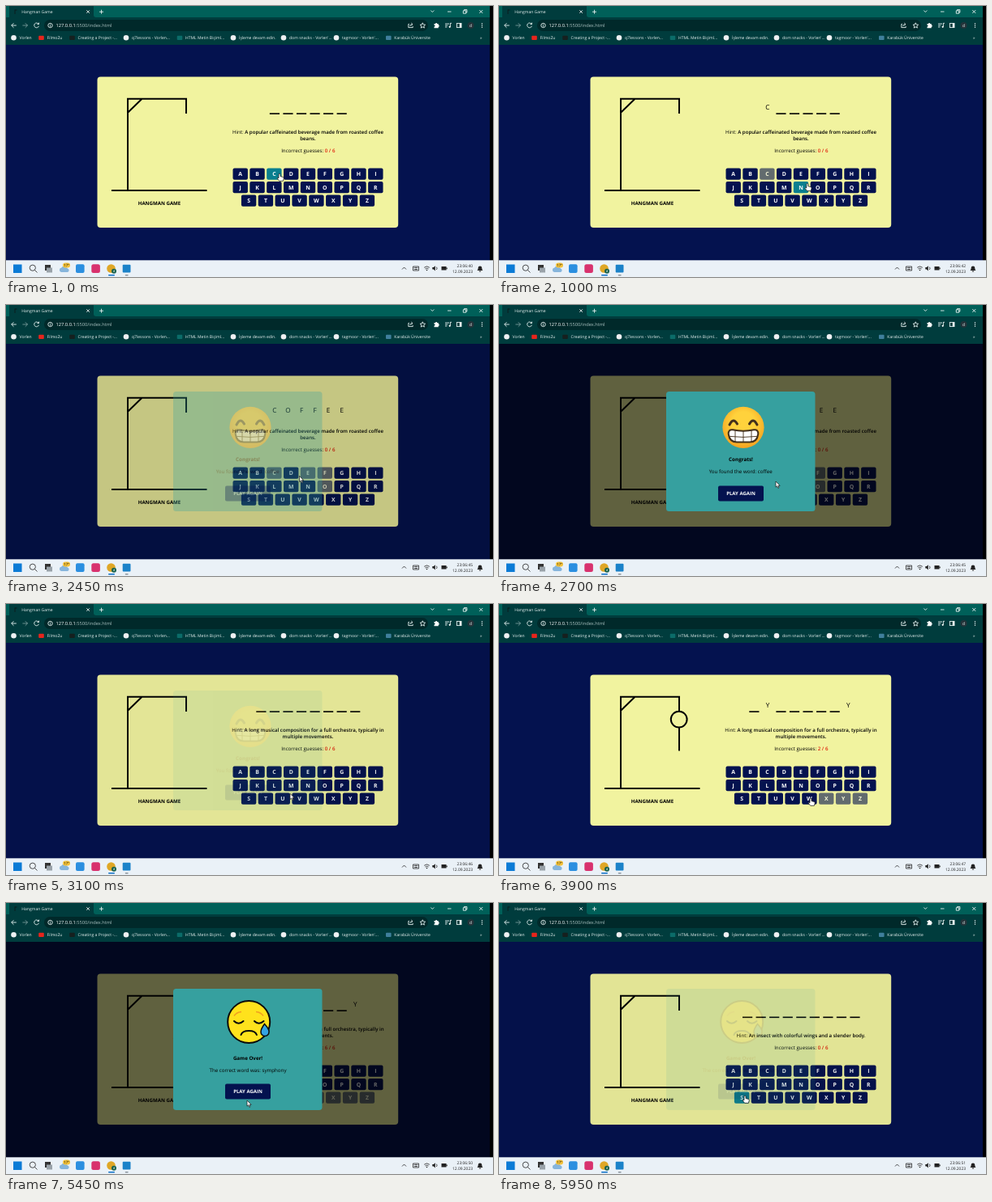
These frames come from a looping animation (600x335 px, 6 s). An HTML page:

```html
<!DOCTYPE html>
<html lang="en">
<head>
<meta charset="utf-8">
<title>Hangman Game</title>
<style>
  html, body { margin: 0; width: 100%; height: 100%; overflow: hidden; background: #000; }
  svg { display: block; width: 600px; height: 335px; font: 6.2px "Open Sans", sans-serif; text-rendering: geometricPrecision; }
  .mid { text-anchor: middle; }
  .end { text-anchor: end; }
  .b { font-weight: 700; }
  .sb { font-weight: 600; }
  .line { fill: none; stroke: #000; stroke-width: 2; }
  .thin { fill: none; stroke: #e6f0ef; stroke-width: .9; }
  .dark { fill: none; stroke: #222; stroke-width: .8; }
  .ui { font-size: 5.05px; fill: #e9f2f1; }
  .key rect { fill: #04124f; }
  .key text { fill: #fff; font-size: 6.9px; font-weight: 700; text-anchor: middle; }
  .key.hover rect { fill: #0a7f8f; }
  .key.used { opacity: .6; }
  .letter { font-size: 8.2px; font-weight: 500; text-anchor: middle; }
  .clock { font-size: 4.9px; fill: #222; text-anchor: end; }
</style>
</head>
<body>
<svg viewBox="0 0 600 335">
  <defs>
    <radialGradient id="gold" cx=".5" cy=".4" r=".62">
      <stop offset=".45" stop-color="#ffd23c"/><stop offset="1" stop-color="#f5a01f"/>
    </radialGradient>
  </defs>

  <!-- browser window -->
  <rect width="596" height="48" fill="#003c3d"/>
  <path d="M108 0H596V14H111Q108 14 108 11Z" fill="#006059"/>
  <path d="M0 0H4V14H0Z" fill="#006059"/>
  <path d="M11 4.5V10M11 5h2.5" stroke="#0a1d1f" fill="none"/>
  <text class="ui" x="19.3" y="9.2">Hangman Game</text>
  <path class="thin" d="M99.3 5.3l3.6 3.6m0-3.6l-3.6 3.6M117.5 4.7v5M115 7.2h5M523.3 5.5l2 2 2-2M544 7h4.5M563.3 5.8h3.4v3.4h-3.4zM564.5 5.8V4.6h3.4V8h-1.2M583.3 5l4 4m0-4l-4 4"/>
  <rect x="47" y="17" width="473" height="14" rx="7" fill="#00292a"/>
  <path class="thin" d="M12.8 24H6.7m2.8-2.8L6.7 24l2.8 2.8"/>
  <path class="thin" d="M20.4 24h6.1m-2.8-2.8l2.8 2.8-2.8 2.8" opacity=".5"/>
  <path class="thin" d="M40 22.2a2.9 2.9 0 1 0 .4 2.6M40.5 20.6v2h-2"/>
  <circle class="thin" cx="54.5" cy="24" r="2.7"/>
  <path class="thin" d="M54.5 23.6v2M54.5 22v.7"/>
  <text x="61.6" y="26.1" font-size="5.7" fill="#fff">127.0.0.1<tspan fill="#a9c0bf">:5500/index.html</tspan></text>
  <path class="thin" d="M497 22.4h-1.2v4.2h5.4v-1.6M497.6 25q.3-2.4 3-2.4m-1.2-1.6l1.6 1.6-1.6 1.6"/>
  <path class="thin" d="M513.3 20.8l1 2.2 2.3.2-1.8 1.6.6 2.3-2.1-1.2-2.1 1.2.6-2.3-1.8-1.6 2.3-.2z"/>
  <path d="M527.5 22h1.5a1.1 1.1 0 0 1 2.2 0h1.5v1.6a1.1 1.1 0 0 1 0 2.2v1.5h-5.2v-1.6a1.1 1.1 0 0 0 0-2.2z" fill="#fff"/>
  <path class="thin" d="M541 22h5M541 24h3.2M541 26h2.4M547.4 21v4.6M547.4 21.3h1.6"/>
  <circle cx="546.7" cy="25.8" r="1.1" fill="#fff"/>
  <rect class="thin" x="555.4" y="21.4" width="5.6" height="5.2"/>
  <path d="M558.8 21.4h2.2v5.2h-2.2z" fill="#fff"/>
  <circle cx="572.5" cy="24" r="4" fill="#24343a"/>
  <text class="ui mid" x="572.5" y="25.8">d</text>
  <g fill="#e9f2f1"><circle cx="586.5" cy="21.7" r=".7"/><circle cx="586.5" cy="24" r=".7"/><circle cx="586.5" cy="26.3" r=".7"/></g>
  <g id="marks"></g>
  <text class="ui" x="584" y="41" font-size="7">»</text>

  <!-- page -->
  <rect y="48" width="596" height="267" fill="#04124f"/>
  <rect x="112.5" y="87.6" width="370.7" height="186.4" rx="4" fill="#f1f39f"/>
  <path class="line" d="M130 228H247.5M150 228V114.7M149 114.7H223M222 114V133M150.3 131.5L167 115.2"/>
  <g id="body" class="line">
    <circle cx="221.7" cy="142.6" r="9.9"/>
    <path d="M222 152.5V181.5"/>
    <path d="M222 152.5L206.5 168.3"/>
    <path d="M222 152.5L237.5 168.3"/>
    <path d="M222 180L207 195"/>
    <path d="M222 180L237 195"/>
  </g>
  <text class="mid b" x="189" y="245.8" font-size="6.1">HANGMAN GAME</text>
  <g id="word"></g>
  <g font-size="6.13">
    <text class="mid" x="372" y="157.8">Hint: <tspan class="sb" id="hint1"></tspan></text>
    <text class="mid sb" x="372" y="166" id="hint2"></text>
  </g>
  <text class="mid" x="372.3" y="181">Incorrect guesses: <tspan class="sb" id="count" fill="#e0200c"></tspan></text>
  <g id="keys"></g>

  <!-- dialogs -->
  <rect id="shade" y="48" width="596" height="267"/>
  <g id="win">
    <rect x="206" y="107" width="183.5" height="148" rx="3.5" fill="#36a09f"/>
    <circle cx="301" cy="151.3" r="25.6" fill="url(#gold)"/>
    <path d="M284 148q4.700-9.500 9.500-1M308.500 147q4.700-8.500 9.500 1" fill="none" stroke="#43301c" stroke-width="3" stroke-linecap="round"/>
    <path d="M288 154.300Q301 157 314 154.300Q319.500 153.500 319.300 159.500Q318 169.500 309 169.500H293Q284 169.500 282.700 159.500Q282.500 153.500 288 154.300Z" fill="#fff" stroke="#43301c" stroke-width="2"/>
    <path d="M283 162.300Q301 164.500 319 162.300M291 155v14M301 156v13.500M311 155v14" fill="none" stroke="#43301c" stroke-width=".9"/>
    <text class="mid b" x="298" y="193.400" font-size="6.300">Congrats!</text>
    <text class="mid" x="297.700" y="208.400">You found the word: coffee</text>
  </g>
  <g id="lose">
    <rect x="206" y="106" width="183.500" height="150" rx="3.500" fill="#36a09f"/>
    <circle cx="299.200" cy="147" r="26" fill="#ffe21c" stroke="#0b0b0b" stroke-width="2"/>
    <path d="M281 139.500q3-4.500 9-5M308 134.500q6 .5 9 5" fill="none" stroke="#f0a020" stroke-width="1.500"/>
    <path d="M281 146q5.500 5.500 11.500 0M306 146q5.500 5.500 11.500 0M289.500 163q1.500-5 9.700-5t9.700 5" fill="none" stroke="#0b0b0b" stroke-width="2" stroke-linecap="round"/>
    <path d="M318.500 149.500Q324.500 156 324 159.500A5 5 0 0 1 314 159.500Q313.800 156 318.500 149.500Z" fill="#35a3e3" stroke="#0b0b0b" stroke-width="1.500"/>
    <text class="mid b" x="298" y="194.300">Game Over!</text>
    <text class="mid" x="298" y="209.300">The correct word was: symphony</text>
  </g>
  <g id="again">
    <rect x="270" y="223.500" width="56" height="19" rx="2" fill="#04124f"/>
    <text class="mid b" x="298" y="235.200" font-size="6" fill="#fff">PLAY AGAIN</text>
  </g>

  <!-- taskbar -->
  <rect y="314.300" width="600" height="20.700" fill="#eaf1f7"/>
  <rect x="9" y="319.500" width="10.500" height="10.500" fill="#0b7bd6"/>
  <circle class="dark" cx="32.800" cy="323.700" r="3.600" stroke-width="1.300"/>
  <path class="dark" d="M35.500 326.500l3 3"/>
  <rect x="48" y="320" width="7" height="7" fill="#333"/>
  <rect x="50" y="323.500" width="7" height="6" fill="#9aa3aa"/>
  <path d="M68 329a2.800 2.800 0 0 1 .4-5.500 4 4 0 0 1 7.400 1 2.300 2.300 0 0 1 0 4.500z" fill="#86b5dc"/>
  <rect x="70" y="317.500" width="9" height="6" rx="3" fill="#f5c33b"/>
  <text class="mid" x="74.700" y="322.200" font-size="4.400">17°</text>
  <rect x="86" y="319.300" width="10.600" height="10.600" rx="2" fill="#2b8fe0"/>
  <rect x="105.300" y="319.300" width="10.600" height="10.600" rx="2.500" fill="#d8326e"/>
  <circle cx="129.500" cy="324.500" r="5.300" fill="#dfa726"/>
  <circle cx="133" cy="327.700" r="3" fill="#17614d"/>
  <text class="mid" x="133" y="329.100" font-size="4" fill="#fff">d</text>
  <rect x="126" y="332" width="8" height="1.400" rx=".7" fill="#0b6fc7"/>
  <rect x="143.700" y="319.700" width="9.800" height="9.800" rx="1" fill="#1b82c9"/>
  <rect x="146.700" y="332" width="4" height="1.400" rx=".7" fill="#8a949c"/>
  <path class="dark" d="M488 325.500l2.500-2.500 2.500 2.500M501.500 322h7v5h-7zM503 325.500h4M502.800 323.600h4.500"/>
  <path class="dark" d="M515.200 323.300q3.300-2.800 6.600 0M516.500 325q2-1.600 4 0"/>
  <circle cx="518.500" cy="326.500" r=".8" fill="#222"/>
  <path d="M525.300 323h1.500l2-1.800v6.200l-2-1.800h-1.500z" fill="#222"/>
  <path class="dark" d="M530.300 322.600q1.500 1.700 0 3.400"/>
  <path d="M536.500 322h6v4.600h-6zM542.700 323.400h1v1.800h-1z" fill="#222"/>
  <text id="clock" class="clock" x="575" y="322.600"></text>
  <text class="clock" x="575" y="330">12.09.2023</text>
  <path d="M580.500 327q1.200-1 1.200-3.200a2.300 2.300 0 0 1 4.600 0q0 2.200 1.200 3.200zM583 327.600h2v1h-2z" fill="#222"/>

  <g id="cursor" stroke="#151515" stroke-width=".7" fill="#fff">
    <path id="hand" d="M-1 .8Q0-.8 1 .8V3.600L4.400 4.500Q5.400 5 5.200 6.200L4.400 9.300H-.3L-2.900 6Q-2.400 4.600-1 5.800Z"/>
    <path id="arrow" d="M0 0V7.200L1.600 5.700 2.800 8.300 4 7.800 2.900 5.300H5.200Z"/>
  </g>
</svg>
<script>
const LOOP = 6000, FADE = 215, LAG = 60;
const NS = "http://www.w3.org/2000/svg";
const $ = id => document.getElementById(id);

function add(parent, tag, attrs = {}, text = "") {
  const node = document.createElementNS(NS, tag);
  for (const name in attrs) node.setAttribute(name, attrs[name]);
  node.textContent = text;
  return parent.appendChild(node);
}

const rounds = [
  { start: 0, word: "COFFEE", hint: ["A popular caffeinated beverage made from roasted coffee", "beans."],
    clicks: { C: 150, O: 1400, F: 1750, E: 2250 } },
  { start: 2950, word: "SYMPHONY", hint: ["A long musical composition for a full orchestra, typically in", "multiple movements."],
    clicks: { Z: 3330, Y: 3570, X: 3760, W: 4010, V: 4290, U: 4600, T: 4900 } },
  { start: 5802, word: "DRAGONFLY", hint: ["An insect with colorful wings and a slender body."], clicks: {} }
];
const dialogs = [
  { node: $("win"), open: 2410, close: 2950 },
  { node: $("lose"), open: 5122, close: 5802 }
];
// time, x, y of the pointer tip
const path = [
  [0, 337, 207], [350, 337, 207], [1300, 393, 223], [1480, 393, 223], [1680, 393, 208], [1780, 392, 208],
  [1920, 357, 209], [2030, 357, 209], [2180, 372, 208], [2330, 372, 208], [2640, 341, 218], [2720, 341, 218],
  [2890, 302, 232], [3000, 302, 232], [3260, 445, 239], [3370, 445, 239], [3500, 425, 239], [3620, 425, 239],
  [3710, 404, 239], [3800, 404, 239], [3900, 384, 240], [4060, 384, 240], [4210, 362, 240], [4340, 362, 240],
  [4520, 341, 240], [4650, 341, 240], [4820, 320, 240], [4950, 320, 240], [5100, 297, 243], [5200, 297, 243],
  [5400, 297, 244], [5500, 297, 244], [5740, 303, 238], [6000, 303, 238]
];

// bookmarks: x, icon colour, round icon, label
[
  [9.5, "#edf0f2", 1, "Vorlen"],
  [43.5, "#e8241c", 0, "FilmoZu"],
  [81.5, "#16201f", 0, "Creating a Project -..."],
  [148, "#edf0f2", 1, "q7lessons - Vorlen..."],
  [214, "#0b6b68", 0, "HTML Metin Biçiml..."],
  [280, "#edf0f2", 1, "İşleme devam edin."],
  [342, "#edf0f2", 1, "dom snacks - Vorlen'..."],
  [407, "#edf0f2", 1, "tagmoor - Vorlen'..."],
  [471.3, "#3f7f9c", 0, "Karabük Üniversite"]
].forEach(([x, fill, round, label]) => {
  add($("marks"), "rect", { x: x - 3.3, y: round ? 36 : 36.7, width: 6.6, height: round ? 6.6 : 5.4, rx: round ? 3.3 : 1, fill });
  add($("marks"), "text", { class: "ui", x: x + 7, y: 41.1 }, label);
});

const keys = [];
["ABCDEFGHI", "JKLMNOPQR", "STUVWXYZ"].forEach((row, r) => {
  [...row].forEach((letter, i) => {
    const x = (r < 2 ? 279.5 : 289.9) + i * 20.83, y = 200.5 + r * 16.5;
    const node = add($("keys"), "g");
    add(node, "rect", { x, y, width: 18.4, height: 14.3, rx: 2 });
    add(node, "text", { x: x + 9.2, y: y + 9.7 }, letter);
    keys.push({ letter, x, y, node });
  });
});

const slots = Array.from({ length: 9 }, () => ({
  dash: add($("word"), "rect", { width: 12.2, height: 1.6 }),
  letter: add($("word"), "text", { class: "letter" })
}));

const show = (node, on) => node.setAttribute("visibility", on ? "visible" : "hidden");
const clamp = x => Math.min(1, Math.max(0, x));
const smooth = x => x * x * (3 - 2 * x);
const ease = x => smooth(clamp(x) ** 0.6);
const inside = ([px, py], x, y, w, h) => px >= x && px <= x + w && py >= y && py <= y + h;
const blocked = t => dialogs.some(d => t >= d.open && t < d.close);

function pointer(t) {
  t = Math.max(0, t);
  const i = Math.max(1, path.findIndex(p => p[0] >= t));
  const [t0, x0, y0] = path[i - 1], [t1, x1, y1] = path[i];
  const k = smooth(clamp((t - t0) / (t1 - t0)));
  return [x0 + (x1 - x0) * k, y0 + (y1 - y0) * k];
}

function drawWord(round, used) {
  const { word, hint } = round;
  const drop = hint.length === 1 ? 8.2 : 0;
  const done = [...word].every(used);
  slots.forEach(({ dash, letter }, i) => {
    const on = i < word.length, hit = on && used(word[i]);
    const mid = 372.3 + (i - (word.length - 1) / 2) * 16.55;
    show(dash, on && !hit);
    show(letter, hit);
    dash.setAttribute("x", mid - 6.1);
    dash.setAttribute("y", 132.3 + drop);
    letter.setAttribute("x", mid);
    letter.setAttribute("y", done ? 133 : 128.2);
    letter.textContent = hit ? word[i] : "";
  });
  $("hint1").textContent = hint[0];
  $("hint1").parentNode.setAttribute("y", 157.8 + drop);
  $("hint2").textContent = hint[1] || "";
}

function draw(t) {
  const round = rounds.filter(r => r.start <= t).pop();
  const used = letter => round.clicks[letter] <= t;
  const wrong = Object.keys(round.clicks).filter(c => used(c) && !round.word.includes(c)).length;

  drawWord(round, used);
  $("count").textContent = wrong + " / 6";
  [...$("body").children].forEach((part, i) => show(part, i < wrong));

  const tip = pointer(t), past = pointer(t - LAG);
  const over = (key, at) => !used(key.letter) && inside(at, key.x, key.y, 18.4, 14.3);
  keys.forEach(key => {
    const hover = !blocked(t) && over(key, past);
    key.node.setAttribute("class", "key" + (used(key.letter) ? " used" : hover ? " hover" : ""));
  });

  let most = 0;
  dialogs.forEach(({ node, open, close }) => {
    const alpha = t < close ? ease((t - open) / FADE) : 1 - ease((t - close) / FADE);
    node.setAttribute("opacity", alpha);
    most = Math.max(most, alpha);
  });
  $("again").setAttribute("opacity", most);
  $("shade").setAttribute("opacity", 0.6 * most);

  const hand = blocked(t - LAG) ? inside(tip, 270, 223.5, 56, 19) : keys.some(key => over(key, tip));
  show($("hand"), hand);
  show($("arrow"), !hand);
  $("cursor").setAttribute("transform", `translate(${tip[0]} ${tip[1]})`);

  $("clock").textContent = "23:06:" + Math.floor(40.45 + t * 0.00187);
}

const begin = performance.now();
function tick() {
  draw((performance.now() - begin) % LOOP);
  requestAnimationFrame(tick);
}
tick();
</script>
</body>
</html>
```
